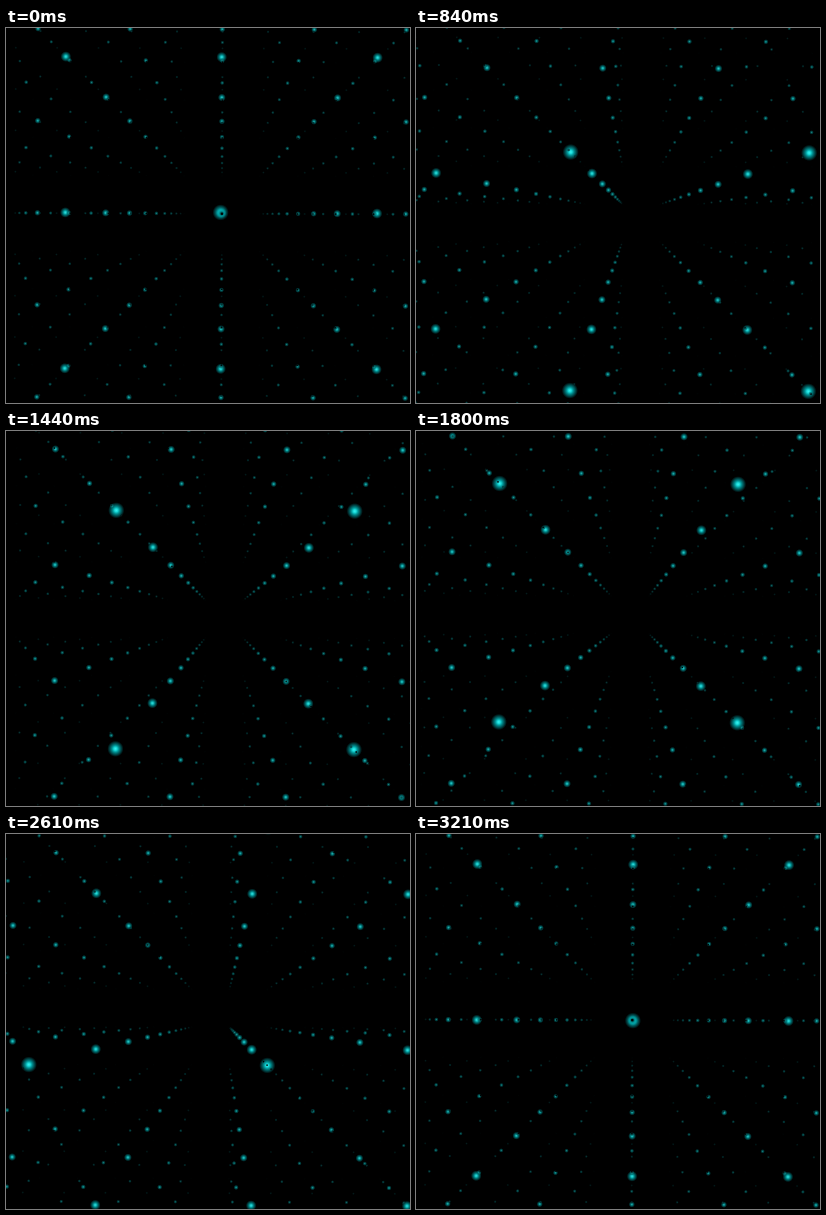
Write an HTML page with a canvas that moves like this. It is 404 px wide and 375 px high and loops after 3.24 s.

```html
<!DOCTYPE html>
<html>
<head>
<meta charset="utf-8">
<title>Point lattice</title>
<style>
html, body { margin: 0; width: 100%; height: 100%; overflow: hidden; background: #000; }
canvas { display: block; }
</style>
</head>
<body>
<canvas id="stage" width="404" height="375"></canvas>
<script>
const ctx = document.getElementById('stage').getContext('2d');
const W = 404, H = 375;
const LOOP = 3240, TICK = 30, STEPS = 107;
const VX = 216.2, VY = 186;      // vanishing point
const FOCAL = 450, NEAR = 1.887, LAYERS = 12;
const ROLL = 0.0035;             // slight camera roll
const START = 0.0065;            // lattice offset at the loop start

// Soft round dot of unit radius, darkened by distance
function dotGradient(fog) {
  const shade = (r, g, b, a) => `rgba(${[r, g, b].map(v => Math.round(v * fog))},${a})`;
  const g = ctx.createRadialGradient(0, 0, 0, 0, 0, 1);
  g.addColorStop(0, shade(60, 242, 240, 1));
  g.addColorStop(0.2, shade(25, 228, 228, 0.95));
  g.addColorStop(0.45, shade(0, 195, 198, 0.7));
  g.addColorStop(0.75, shade(0, 175, 180, 0.35));
  g.addColorStop(1, shade(0, 160, 165, 0));
  return g;
}

const layers = Array.from({ length: LAYERS }, (_, n) => {
  const z = NEAR + n;
  const gap = FOCAL / z;
  const fog = Math.max(0, Math.min(1, 1.2 - z / 10));
  return { gap, radius: gap * 0.034, fill: dotGradient(fog) };
});

function drawLayer({ gap, radius, fill }, shift) {
  const cols = Math.ceil(W / 2 / gap) + 1;
  const rows = Math.ceil(H / 2 / gap) + 1;
  ctx.fillStyle = fill;
  for (let j = -rows; j <= rows; j++) {
    for (let i = -cols; i <= cols; i++) {
      const dx = (i - shift) * gap, dy = (j - shift) * gap;
      ctx.setTransform(radius, 0, 0, radius, VX + dx - ROLL * dy, VY + dy + ROLL * dx);
      ctx.fillRect(-1, -1, 2, 2);
    }
  }
}

function draw(now) {
  const tick = Math.floor(now % LOOP / TICK);
  const step = tick > 5 ? tick - 1 : tick;   // one tick holds still
  const shift = START + step / STEPS;
  ctx.setTransform(1, 0, 0, 1, 0, 0);
  ctx.fillStyle = '#000';
  ctx.fillRect(0, 0, W, H);
  // Near to far: distant dots darken the ones they cover
  for (const layer of layers) drawLayer(layer, shift);
}

const begin = performance.now();
function frame() {
  draw(performance.now() - begin);
  requestAnimationFrame(frame);
}
frame();
</script>
</body>
</html>
```
